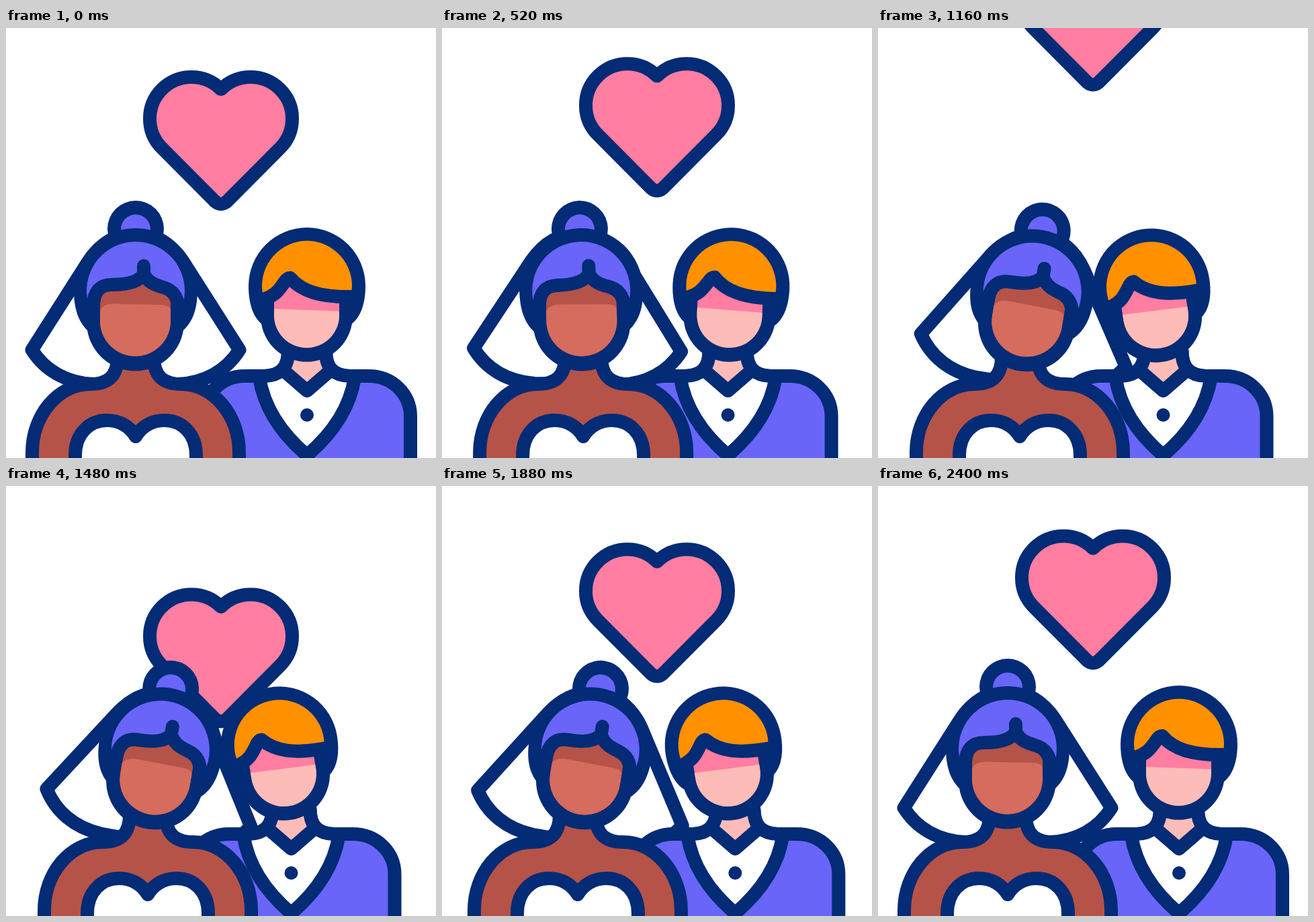
Recreate the animation shown at these times as an HTML page with a canvas. Size 640 px wide and 640 px high, loop 2.44 s.

```html
<!DOCTYPE html>
<html lang="en">
<head>
<meta charset="utf-8">
<title>Newlyweds</title>
<style>
  html, body { margin: 0; width: 100%; height: 100%; overflow: hidden; background: #fff; }
  canvas { display: block; width: 100vw; height: 100vh; }
</style>
</head>
<body>
<canvas id="stage" width="640" height="640"></canvas>
<script>
const ctx = document.getElementById('stage').getContext('2d');
const LOOP = 2440;
const NAVY = '#032b76', PURPLE = '#6865f8', PINK = '#ff7ea1', ORANGE = '#ff9100';
const BLUSH = '#fdbcb7', BROWN = '#b55348', TAN = '#d56c5d', WHITE = '#fff';
const BRIDE_X = 193, GROOM_X = 448;

const path = d => new Path2D(d);
const shapes = {
  veil: path('M38.5 479 L122 348 Q150 306 193 306 Q236 306 264 348 L347.5 479 C328 510 296 528 256 530 H130 C90 528 58 510 38.5 479Z'),
  brideBody: path('M39 670 V632 C39 576 78 530 125 530 C150 530 166 520 166 490 H220 C220 520 236 530 261 530 C308 530 347 576 347 632 V670Z'),
  dress: path('M103 670 V636 C103 604 124 584 150 584 C170 584 185 594 193 608 C201 594 216 584 236 584 C262 584 283 604 283 636 V670Z'),
  brideHead: path('M101 390 A92 92 0 0 1 285 390 C285 418 278 437 264 450 A72.5 72.5 0 0 1 121 450 C108 437 101 418 101 390Z'),
  brideFace: path('M140 366 H245 V436 A52.5 52.5 0 0 1 140 436Z'),
  brideLight: path('M140 420 Q145 411 158 410.5 L232 412 Q243 413 245 418 V436 A52.5 52.5 0 0 1 140 436Z'),
  brideHair: path('M121 403 A73 73 0 1 1 265 403 L256 416 C256 400 248 390 234 386 C224 383 212 380 205 366 C198 378 180 382 158 382 C140 382 130 392 130 415Z'),
  brideFringe: path('M130 415 C130 392 140 382 158 382 C180 382 198 378 205 366 V354 V366 C212 380 224 383 234 386 C248 390 256 400 256 416'),
  jacket: path('M294 670 V578 C294 545 321 518 355 518 H385 C408 517 420 507 420 480 H476 C476 507 488 517 511 518 H540 C575 518 602 545 602 578 V670Z'),
  shirt: path('M377 520 C384 565 408 602 448 636 C488 602 512 565 519 520 L478 514 L448 540 L418 514Z'),
  groomNeck: path('M420 480 L418 514 L448 540 L478 514 L476 480Z'),
  neckline: path('M420 482 C420 506 408 517 385 518 M476 482 C476 506 488 517 511 518'),
  lapels: path('M377 520 C384 565 408 602 448 636 C488 602 512 565 519 520'),
  collar: path('M418 514 L448 540 L478 514'),
  groomHead: path('M361 384 A87 87 0 0 1 535 384 C535 410 528 430 515 440 A68.5 68.5 0 0 1 380 440 C368 430 361 410 361 384Z'),
  groomFace: path('M399 372 H496 V427.5 A48.5 48.5 0 0 1 399 427.5Z'),
  groomLight: path('M399 418 L496 421.5 V427.5 A48.5 48.5 0 0 1 399 427.5Z'),
  groomHair: path('M381.5 392 A67 67 0 1 1 514.5 392 L515 400 C468 401 440 392 423 372 Q418 372 414 379 C407 388 402 398 385 403Z'),
  groomFringe: path('M385 403 C402 398 407 388 414 379 Q418 372 423 372 C440 392 468 401 515 400')
};

// Each track lists [time, value] stops joined by a smooth ease.
const tracks = {
  step: [[0, 0], [600, 1], [1680, 1], [2080, 0]],
  brideTilt: [[0, 0], [300, -3.4], [1200, 9.5], [1860, 9.6], [2240, 0]],
  groomTilt: [[0, 0], [300, 4.6], [1200, -9.3], [1860, -9.4], [2240, 0]],
  veilSwing: [[0, 0], [240, 3.4], [520, 2.4], [880, 3], [1240, -0.8], [1640, 1.8], [1900, 0.2], [2080, -1.5], [2240, 0]]
};

function valueAt(stops, t) {
  const next = stops.findIndex(stop => stop[0] > t);
  if (next < 0) return stops[stops.length - 1][1];
  const [t0, v0] = stops[next - 1], [t1, v1] = stops[next];
  const p = (t - t0) / (t1 - t0);
  return v0 + (v1 - v0) * p * p * (3 - 2 * p);
}

// Steady drift, with a fast exit at the top and re-entry from below.
function heartOffset(t) {
  const drift = 0.038;
  if (t < 1280) return -drift * t - 385 * Math.max(0, (t - 880) / 400) ** 3;
  return drift * (LOOP - t) + 265 * Math.max(0, (1760 - t) / 480) ** 3;
}

function fill(shape, color) {
  ctx.fillStyle = color;
  ctx.fill(shape);
}

function outline(shape) {
  ctx.strokeStyle = NAVY;
  ctx.lineWidth = 20;
  ctx.lineCap = ctx.lineJoin = 'round';
  ctx.stroke(shape);
}

function outlined(shape, color) {
  fill(shape, color);
  outline(shape);
}

function disc(x, y, r, color) {
  const circle = new Path2D();
  circle.arc(x, y, r, 0, 2 * Math.PI);
  fill(circle, color);
}

function shifted(dx, dy, draw) {
  ctx.save();
  ctx.translate(dx, dy);
  draw();
  ctx.restore();
}

function rotated(degrees, x, y, draw) {
  ctx.save();
  ctx.translate(x, y);
  ctx.rotate(degrees * Math.PI / 180);
  ctx.translate(-x, -y);
  draw();
  ctx.restore();
}

function drawHeart() {
  const heart = new Path2D();
  heart.arc(276, 135, 62, -Math.PI / 4, 3 * Math.PI / 4, true);
  heart.lineTo(311, 258);
  heart.quadraticCurveTo(320, 266, 329, 258);
  heart.arc(364, 135, 62, Math.PI / 4, -3 * Math.PI / 4, true);
  heart.closePath();
  outlined(heart, PINK);
}

function drawHead(name, skin, light, hair) {
  fill(shapes[name + 'Head'], NAVY);
  fill(shapes[name + 'Face'], skin);
  fill(shapes[name + 'Light'], light);
  fill(shapes[name + 'Hair'], hair);
  outline(shapes[name + 'Fringe']);
}

function drawGroom(tilt) {
  outlined(shapes.jacket, PURPLE);
  fill(shapes.shirt, WHITE);
  fill(shapes.groomNeck, BLUSH);
  outline(shapes.lapels);
  outline(shapes.collar);
  outline(shapes.neckline);
  disc(GROOM_X, 576, 10, NAVY);
  rotated(tilt, GROOM_X, 493, () => drawHead('groom', PINK, BLUSH, ORANGE));
}

function drawBride(tilt) {
  outlined(shapes.brideBody, BROWN);
  outlined(shapes.dress, WHITE);
  rotated(tilt, BRIDE_X, 505, () => {
    disc(BRIDE_X, 299, 42, NAVY);
    disc(BRIDE_X, 299.5, 22, PURPLE);
    drawHead('bride', BROWN, TAN, PURPLE);
  });
}

function render(t) {
  const step = valueAt(tracks.step, t);
  const brideTilt = valueAt(tracks.brideTilt, t);
  const swing = valueAt(tracks.veilSwing, t);

  ctx.fillStyle = WHITE;
  ctx.fillRect(0, 0, 640, 640);
  shifted(0, heartOffset(t), drawHeart);
  shifted(18 * step, 0, () =>
    rotated(brideTilt, BRIDE_X, 505, () =>
      rotated(swing, BRIDE_X, 290, () => outlined(shapes.veil, WHITE))));
  shifted(-23.5 * step, 0, () => drawGroom(valueAt(tracks.groomTilt, t)));
  shifted(18 * step, 0, () => drawBride(brideTilt));
}

const start = performance.now();
function tick() {
  render((performance.now() - start) % LOOP);
  requestAnimationFrame(tick);
}
tick();
</script>
</body>
</html>
```
